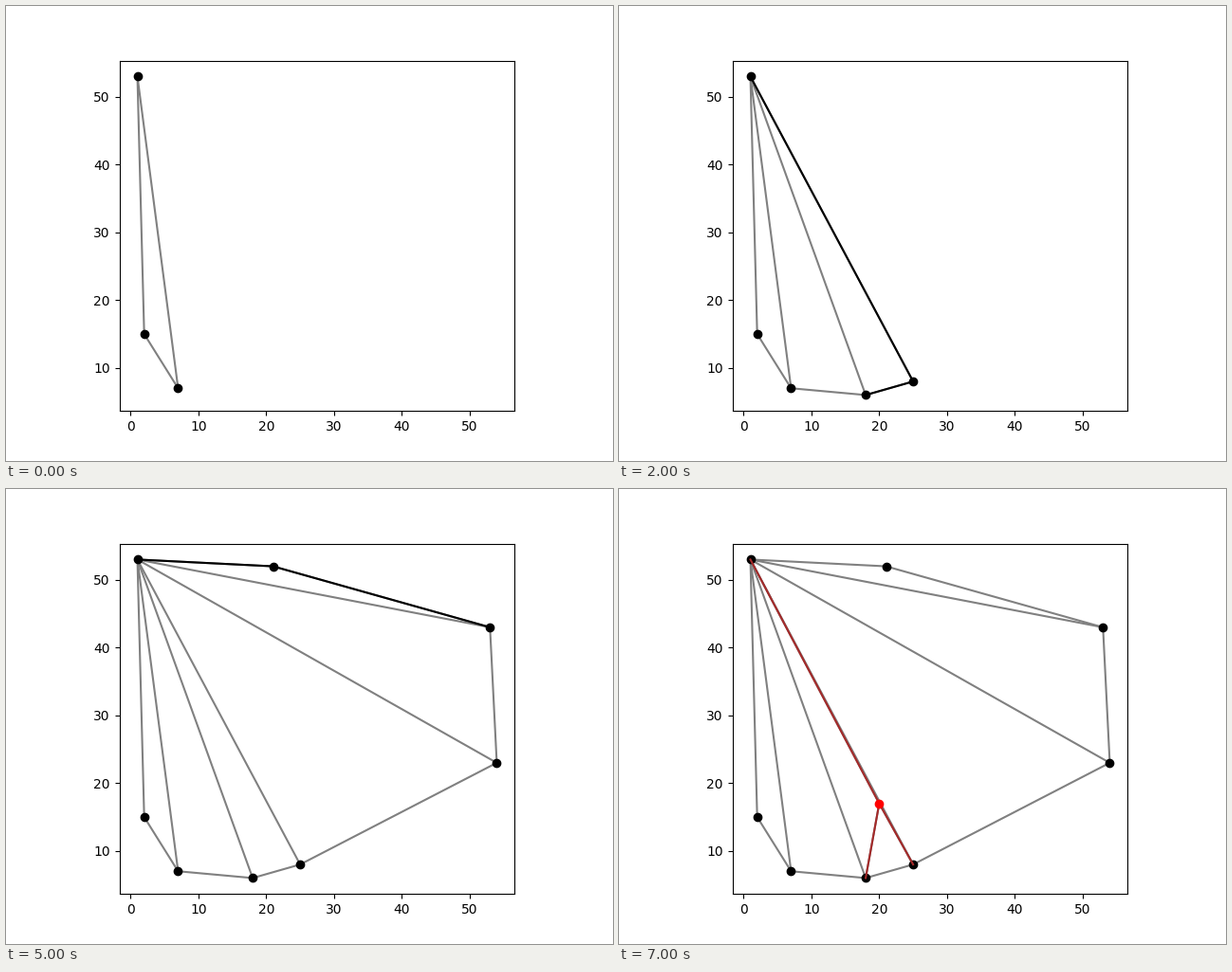
Animation, 640 px wide and 480 px high, one loop 8 s. Source, as a matplotlib script:

```python
import matplotlib.pyplot as plt
from matplotlib.animation import FuncAnimation

APEX = (1, 53)
RIM = [(2, 15), (7, 7), (18, 6), (25, 8), (54, 23), (53, 43), (21, 52)]
QUERY = (20, 17)
STEPS, STEP_MS = 8, 1000

fig, ax = plt.subplots(figsize=(6.4, 4.8), dpi=100)


def edge(a, b, color, z):
    ax.plot([a[0], b[0]], [a[1], b[1]], color=color, zorder=z)


def dot(p, color, z):
    ax.plot(*p, "o", color=color, zorder=z)


def draw(step):
    ax.clear()
    ax.set_aspect("equal")
    xs, ys = zip(APEX, *RIM)
    mx, my = (0.05 * (max(v) - min(v)) for v in (xs, ys))
    ax.set_xlim(min(xs) - mx, max(xs) + mx)
    ax.set_ylim(min(ys) - my, max(ys) + my)

    # fan triangulation grown one rim point at a time
    shown = RIM[:min(step + 2, len(RIM))]
    for p in shown:
        edge(APEX, p, "gray", 2)
    for a, b in zip(shown, shown[1:]):
        edge(a, b, "gray", 2)
    if 0 < step < 6:
        edge(APEX, shown[-1], "black", 3)
        edge(shown[-2], shown[-1], "black", 3)
    for p in [APEX] + shown:
        dot(p, "black", 4)

    # locate the query point, then split its triangle
    if step == 6:
        edge(APEX, RIM[3], "red", 5)
    elif step == 7:
        for p in (APEX, RIM[2], RIM[3]):
            edge(QUERY, p, "gray", 2)
            edge(QUERY, p, "brown", 5)
    if step >= 6:
        dot(QUERY, "red", 6)
    return []


anim = FuncAnimation(fig, draw, frames=STEPS, interval=STEP_MS,
                     init_func=lambda: draw(0), repeat=True, repeat_delay=0)
plt.show()
```
